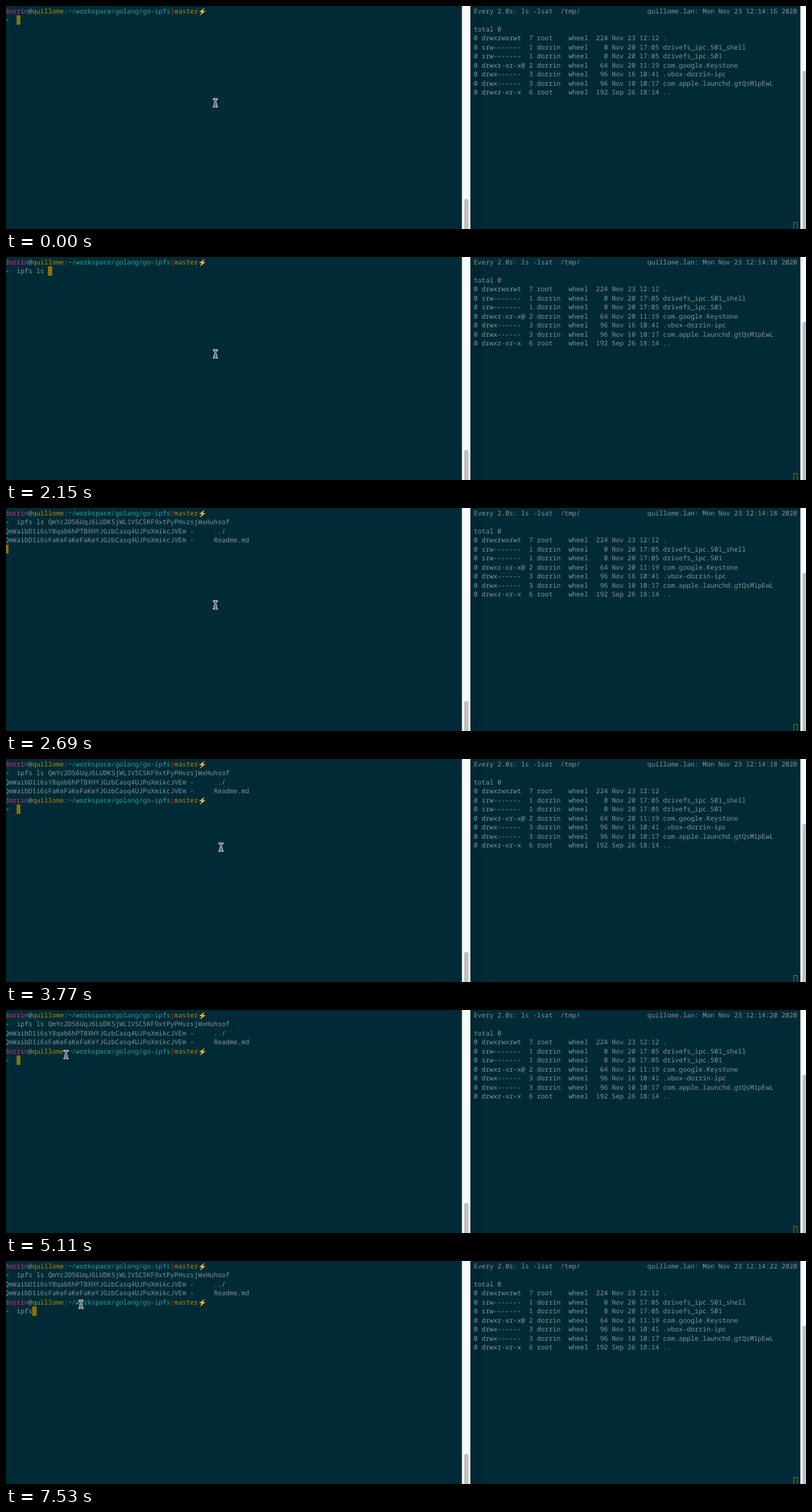
An HTML page with a canvas that plays this animation: 1280x358 px, repeating every 8000 ms.

```html
<!DOCTYPE html>
<html lang="en">
<head>
<meta charset="utf-8">
<title>Terminal session</title>
<style>
  html, body { margin: 0; width: 100%; height: 100%; overflow: hidden; background: #002b36; }
  #stage { position: relative; width: 1280px; height: 358px; overflow: hidden; }
  canvas { position: absolute; left: 0; top: 0; }
  .pane {
    position: absolute; top: 1px; color: #839496;
    font: 10.525px/16px "Noto Sans Mono", "DejaVu Sans Mono", monospace;
    font-variant-ligatures: none; text-rendering: geometricPrecision;
  }
  #left { left: -2px; }
  #right { left: 748.5px; }
  .row { position: absolute; left: 0; white-space: pre; }
  .user { color: #d33682; }
  .host, .branch { color: #b58900; }
  .path, .arrow { color: #2aa198; }
  .arrow { font-family: "DejaVu Sans Mono", monospace; line-height: 0; }
  .bar { color: #dc322f; }
  .caret, .sel { display: inline-block; height: 14.45px; vertical-align: top; }
  .caret { width: 6.315px; background: #897200; }
  .sel { background: #839496; color: #002b36; }
  .bolt { position: absolute; left: 309px; top: 1px; width: 14px; height: 14px; }
  #pointer { position: absolute; left: 0; top: 0; width: 14px; height: 20px; }
</style>
</head>
<body>
<div id="stage">
  <canvas id="frame" width="1280" height="358"></canvas>
  <div id="left" class="pane"></div>
  <div id="right" class="pane"></div>
  <svg id="pointer" viewBox="-7 -10 14 20" fill="none" stroke-linecap="round">
    <g id="beam"></g>
  </svg>
</div>
<script>
const LOOP = 8000, PITCH = 14.45;
const USER = 'dorrin', HOST = 'quillome';
const HASH = 'QmYc2D56UqJ6LUDKSjWL1VSC5KF9xtPyPHvzsjWxHuhsof';

// Each track lists [start ms, value]; values hold until the next entry.
const firstTyping = [[0, ''], [1350, 'ipf'], [1620, 'ipfs '], [1880, 'ipfs ls'], [2150, 'ipfs ls ']];
const secondTyping = [[0, ''], [7260, 'i'], [7530, 'ipfs']];
const seconds = [[0, 16], [2150, 18], [4040, 20], [6190, 22]];
const pointerPath = [
  [0, [335, 155.5]], [3770, [344, 141.5]], [4040, [117, 94]], [4310, [106, 77.5]],
  [4570, [106, 78.5]], [4840, [99.5, 72]], [5110, [96, 71.5]], [5380, [122, 69.5]],
  [5650, [120, 69.5]]
];
const PASTE = 2420, RUN = 2690, PROMPT = 2960;

const $ = id => document.getElementById(id);
const at = (track, t) => track.filter(k => k[0] <= t).pop()[1];
const span = (cls, text = '') => `<span class="${cls}">${text}</span>`;
const rows = lines => lines.map((line, i) =>
  `<div class="row" style="top:${(i * PITCH).toFixed(2)}px">${line}</div>`).join('');

const caret = span('caret');
const arrow = span('arrow', '⇒') + '  ';
const bolt = '<svg class="bolt" viewBox="0 0 14 14"><path fill="#ffb92e" ' +
  'd="M11 .8 1.8 7.8H6.3L2.8 13.6 12.4 6.2H7.9Z"/></svg>';
const prompt = span('user', USER) + '@' + span('host', HOST) + ':' +
  span('path', '~/workspace/golang/go-ipfs') + span('bar', '|') + span('branch', 'master') + bolt;

function leftLines(t) {
  if (t < PASTE) return [prompt, arrow + at(firstTyping, t) + caret];
  if (t < RUN) return [prompt, arrow + 'ipfs ls ' + span('sel', HASH) + caret];
  const done = [
    prompt,
    arrow + 'ipfs ls ' + HASH,
    'QmWaibD1i6sY8qab6hPTBXHYJGzbCasq4UJPoXmikcJVEm -     ../',
    'QmWaibD1i6sFaKeFaKeFaKeYJGzbCasq4UJPoXmikcJVEm -     Readme.md'
  ];
  if (t < PROMPT) return [...done, caret];
  return [...done, prompt, arrow + at(secondTyping, t) + caret];
}

function entry(mode, links, owner, size, date, name) {
  return `0 ${mode.padEnd(11)} ${links} ${owner.padEnd(6)}  wheel  ${String(size).padStart(3)} ${date} ${name}`;
}

const listing = [
  '',
  'total 0',
  entry('drwxrwxrwt', 7, 'root', 224, 'Nov 23 12:12', '.'),
  entry('srw-------', 1, USER, 0, 'Nov 20 17:05', 'drivefs_ipc.501_shell'),
  entry('srw-------', 1, USER, 0, 'Nov 20 17:05', 'drivefs_ipc.501'),
  entry('drwxr-xr-x@', 2, USER, 64, 'Nov 20 11:19', 'com.google.Keystone'),
  entry('drwx------', 3, USER, 96, 'Nov 16 10:41', `.vbox-${USER}-ipc`),
  entry('drwx------', 3, USER, 96, 'Nov 10 10:17', 'com.apple.launchd.gtQsM1pEwL'),
  entry('drwxr-xr-x', 6, 'root', 192, 'Sep 26 18:14', '..')
];

function rightLines(t) {
  const clock = `${HOST}.lan: Mon Nov 23 12:14:${at(seconds, t)} 2020`;
  return ['Every 2.0s: ls -lsat  /tmp/'.padEnd(44) + clock, ...listing];
}

function drawFrame() {
  const g = $('frame').getContext('2d');
  const rect = (color, x, y, w, h) => { g.fillStyle = color; g.fillRect(x, y, w, h); };
  const thumb = (x, y, w, h) => {
    g.fillStyle = '#c1c1c1';
    g.beginPath();
    g.roundRect(x, y, w, h, 3.5);
    g.fill();
  };
  rect('#002b36', 0, 0, 1280, 358);
  rect('rgba(0,0,0,.09)', 743, 0, 18, 358);

  rect('#fafafa', 729.5, 0, 13.5, 358);
  thumb(733, 309.5, 7, 60);
  rect('#fafafa', 1271, 0, 9, 358);
  thumb(1274.5, 104, 7, 270);

  g.strokeStyle = '#897200';
  g.strokeRect(1260.5, 347.5, 5.5, PITCH);
}

function drawBeam() {
  const d = 'M-2.6 -6Q-.5 -6 0 -4.8Q.5 -6 2.6 -6M0 -4.8V4.8M-2.6 6Q-.5 6 0 4.8Q.5 6 2.6 6M-1.4 2H1.4';
  $('beam').innerHTML =
    `<path d="${d}" stroke="#fff" stroke-width="3"/><path d="${d}" stroke="#111" stroke-width="1.1"/>`;
}

const shown = {};
function fill(id, html) {
  if (shown[id] !== html) $(id).innerHTML = shown[id] = html;
}

function render(now) {
  const t = now % LOOP;
  fill('left', rows(leftLines(t)));
  fill('right', rows(rightLines(t)));
  const [x, y] = at(pointerPath, t);
  $('pointer').style.transform = `translate(${x - 7}px, ${y - 10}px)`;
}

drawFrame();
drawBeam();
const start = performance.now();
function tick() {
  render(performance.now() - start);
  requestAnimationFrame(tick);
}
tick();
</script>
</body>
</html>
```
